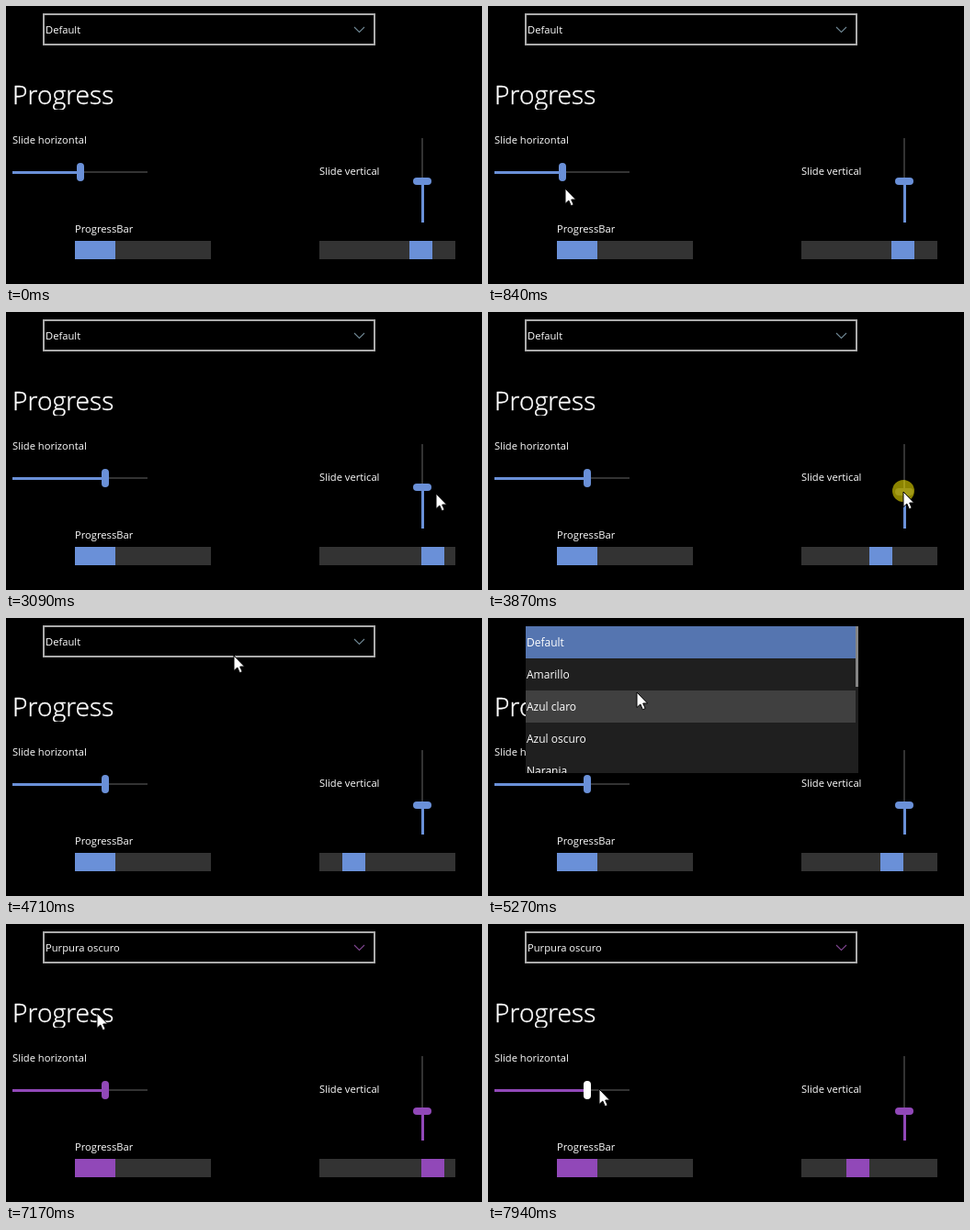
An HTML page with a canvas for the animation above (8000 ms loop, 518 px wide and 303 px high).

```html
<!DOCTYPE html>
<html lang="es">
<head>
<meta charset="utf-8">
<title>Controls</title>
<style>
  html, body { margin: 0; width: 100%; height: 100%; overflow: hidden; background: #000; }
  canvas { display: block; }
</style>
</head>
<body>
<canvas id="stage" width="518" height="303"></canvas>
<script>
const ctx = document.getElementById('stage').getContext('2d');
const LOOP = 8000;
const FONT = '"Open Sans", "Noto Sans", sans-serif';
const ITEMS = ['Default', 'Amarillo', 'Azul claro', 'Azul oscuro', 'Naranja', 'Rojo', 'Rosa',
  'Purpura claro', 'Purpura oscuro', 'Verde claro', 'Verde oscuro'];
const BLUE = { accent: '#6a90d8', chevron: '#6f8794' };
const PURPLE = { accent: '#9148b8', chevron: '#7f4590' };
const TRACK = '#333333';
const ROW = 35;
const OPEN = 5040, CHOOSE = 6950;

// The pointer glides to each place in turn; a drag moves a slider along one axis.
const GLIDE = 500;
const START = { x: 110, y: 306 };
const MOVES = [
  { at: 450, x: 81, y: 184 },
  { at: 970, x: 35, drag: true },
  { at: 1470, x: 108, drag: true },
  { at: 2580, x: 469, y: 198 },
  { at: 3150, x: 453, y: 191 },
  { at: 3650, y: 204, drag: true },
  { at: 4320, x: 221, y: 18 },
  { at: 4900, x: 152, y: 94 },
  { at: 5500, x: 100, y: 124 },
  { at: 6400, y: 97 },
  { at: 7450, x: 122, y: 180 }
];
const DRAGS = MOVES.filter(move => move.drag);

const between = (v, a, b) => v >= a && v < b;
const isActive = (move, t) => between(t, move.at, move.at + GLIDE);

function follow(t, moves, start) {
  return moves.reduce((p, { at, x = p.x, y = p.y }) => {
    const u = Math.min(1, Math.max(0, (t - at) / GLIDE));
    const eased = u * u * (3 - 2 * u);
    return { x: p.x + (x - p.x) * eased, y: p.y + (y - p.y) * eased };
  }, start);
}

function box(x, y, w, h, color) {
  ctx.fillStyle = color;
  ctx.fillRect(x, y, w, h);
}

function pill(x, y, w, h, color) {
  ctx.fillStyle = color;
  ctx.beginPath();
  ctx.roundRect(x, y, w, h, 4);
  ctx.fill();
}

function label(text, x, y, size = 11.2, weight = 400) {
  ctx.font = `${weight} ${size}px ${FONT}`;
  ctx.fillStyle = '#fff';
  ctx.fillText(text, x, y);
}

function clipped(x, y, w, h, draw) {
  ctx.save();
  ctx.beginPath();
  ctx.rect(x, y, w, h);
  ctx.clip();
  draw();
  ctx.restore();
}

function drawHeading() {
  clipped(0, 70, 200, 43, () => {
    label('Progress', 7, 107, 28.2, 300);
    ctx.strokeStyle = '#fff';
    ctx.lineWidth = 0.4;
    ctx.strokeText('Progress', 7, 107);
  });
}

function drawCombo(text, color) {
  ctx.strokeStyle = '#ababab';
  ctx.lineWidth = 2;
  ctx.strokeRect(41, 9, 360, 33);
  label(text, 43, 30);
  ctx.strokeStyle = color;
  ctx.lineWidth = 1.1;
  ctx.stroke(new Path2D('M379 23L384.5 28.5L390 23'));
}

function drawList(t, mouse) {
  const notches = (t >= 5800) + (t >= 6480);
  const scroll = notches * 3 * ROW;
  const height = 160, total = ITEMS.length * ROW;
  clipped(41, 9, 362, height, () => {
    box(41, 9, 362, height, '#1f1f1f');
    ITEMS.forEach((item, i) => {
      const y = 9 + i * ROW - scroll;
      if (i === 0) box(41, y, 359, ROW, '#5575b0');
      else if (between(mouse.y, y, y + ROW)) box(41, y, 359, ROW, '#404040');
      label(item, 42, y + 22, 12);
    });
    box(400, 9 + Math.round(scroll * height / total), 3, Math.round(height * height / total), '#858585');
  });
}

function drawSliders(t, mouse, accent) {
  const thumb = follow(t, DRAGS, { x: 81, y: 191 });
  const x = Math.round(thumb.x), y = Math.round(thumb.y);
  const held = DRAGS.some(move => isActive(move, t));
  const thumbColor = hover => !hover ? accent : held ? TRACK : '#fff';
  const hoverX = between(mouse.x, 0, 155) && between(mouse.y, 171, 191);
  const hoverY = between(mouse.x, 443, 463) && between(mouse.y, 144, 236);

  box(7, 180, 147, 2, TRACK);
  box(7, 180, x - 7, 3, accent);
  pill(x - 4, 171, 8, 20, thumbColor(hoverX));

  box(452, 144, 2, 92, TRACK);
  box(452, y, 3, 236 - y, accent);
  pill(443, y - 4, 20, 8, thumbColor(hoverY));
}

function drawBars(t, accent) {
  box(75, 256, 148, 20, TRACK);
  box(75, 256, 44, 20, accent);
  // The block bounces over ten half-block steps, one every 52 ms.
  const phase = (2 + Math.floor(t / 52)) % 20;
  const step = Math.abs(10 - phase);
  box(341, 256, 148, 20, TRACK);
  box(341 + Math.round(step * 12.3), 256, 25, 20, accent);
}

function drawPointer(t, { x, y }) {
  const clicking = [OPEN, CHOOSE].some(time => between(t, time - 100, time));
  ctx.save();
  ctx.translate(Math.round(x) - 1, Math.round(y));
  if (clicking || DRAGS.some(move => isActive(move, t))) {
    ctx.fillStyle = 'rgba(255, 240, 0, .55)';
    ctx.beginPath();
    ctx.arc(0, -1, 12, 0, 2 * Math.PI);
    ctx.fill();
  }
  const arrow = new Path2D('M0 0V16.5L3.8 13L6.4 18.8L9.2 17.5L6.7 12H11.6Z');
  ctx.fillStyle = '#fff';
  ctx.strokeStyle = '#000';
  ctx.lineWidth = 1;
  ctx.fill(arrow);
  ctx.stroke(arrow);
  ctx.restore();
}

function draw(t) {
  const mouse = follow(t, MOVES, START);
  const chosen = t >= CHOOSE;
  const { accent, chevron } = chosen ? PURPLE : BLUE;

  box(0, 0, 518, 303, '#000');
  drawHeading();
  label('Slide horizontal', 7, 150);
  label('Slide vertical', 341, 184);
  label('ProgressBar', 75, 247);
  drawSliders(t, mouse, accent);
  drawBars(t, accent);
  if (between(t, OPEN, CHOOSE)) drawList(t, mouse);
  else drawCombo(ITEMS[chosen ? 8 : 0], chevron);
  drawPointer(t, mouse);
}

const start = performance.now();
function tick() {
  draw((performance.now() - start) % LOOP);
  requestAnimationFrame(tick);
}
tick();
</script>
</body>
</html>
```
